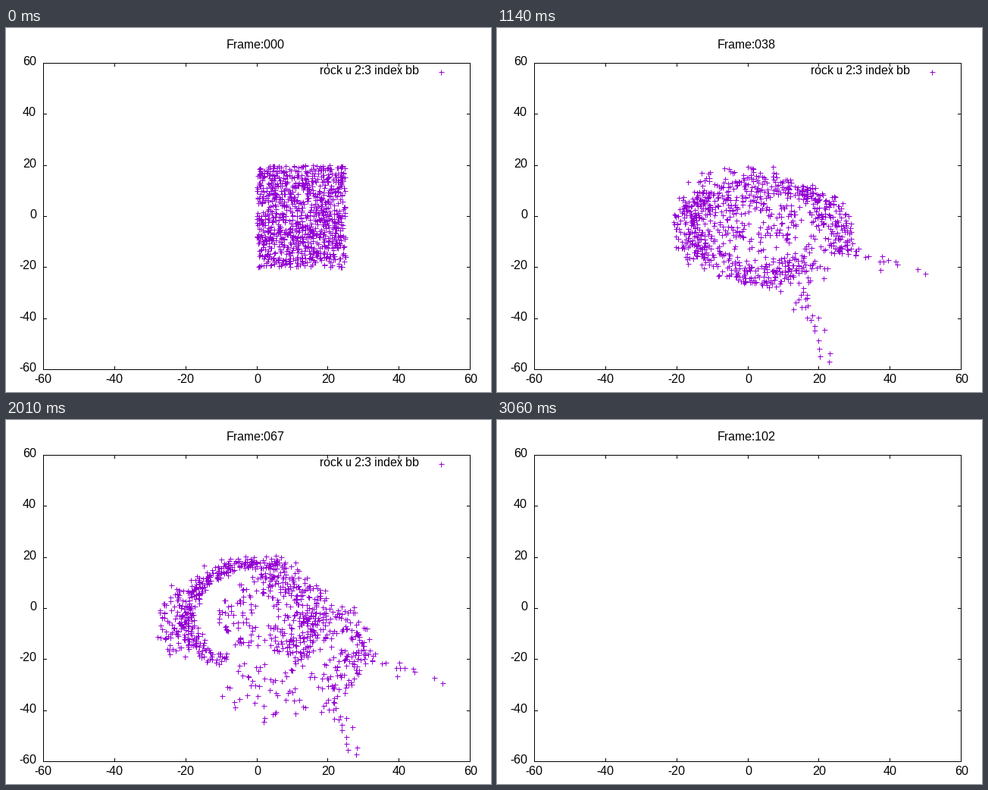
A matplotlib script that plays this animation: 640x480 px, repeating every 3.09 s.

```python
import numpy as np
import matplotlib.pyplot as plt
from matplotlib.animation import FuncAnimation

W, H, DPI = 640, 480, 100
FRAMES, STEP = 103, 30
PX = 72 / DPI
VIOLET = "#9400d3"
LEFT, RIGHT, TOP, BOTTOM = 49, 612, 45, 449
N = 1000
FALL, SETTLE, WIND = 14, 16, 78   # frames of collapse, easing and winding up
CORE = 0.48

plt.rcParams.update({"font.family": "Liberation Sans",
                     "text.hinting": "native", "text.hinting_factor": 1})
rng = np.random.default_rng(7)

# The starting block and the turned, flattened disc it collapses into
block = np.column_stack([rng.uniform(0, 25, N), rng.uniform(-20, 20, N)])
bx, by = block[:, 0] / 12.5 - 1, block[:, 1] / 20
disc = (bx * np.sqrt(1 - by**2 / 2) + 1j * by * np.sqrt(1 - bx**2 / 2)) * np.exp(-0.6j)
rad = np.abs(disc)
phi = (np.degrees(np.angle(disc)) + 90) % 360 - 90
wx = disc.real + 0.12 * (1 - disc.real**2)
leaf = np.column_stack([8 + 21 * wx, -0.5 + 14.5 * disc.imag + 3 * wx])
noise = rng.normal(0, 0.9, (N, 2))
free = np.ones(N, bool)


def take(idx):
    free[idx] = False
    return idx


def sample(count):
    idx = take(rng.choice(np.flatnonzero(free), count, replace=False))
    return idx, rng.random(count), rng.random(count)


def sector(a, b, inner=CORE, outer=1.0):
    """Pieces of one disc sector with their place along and across it."""
    idx = take(np.flatnonzero(free & (phi >= a) & (phi < b) & (rad >= inner)))
    u = (phi[idx] - a) / (b - a)
    v = np.clip((rad[idx]**2 - inner**2) / (outer**2 - inner**2), 0, 1)
    return idx, u, v


fast = take(np.argsort(rad)[:4])
fast_dir = np.radians(197 + 90 * np.arange(4))
fast_v = 5.6 * np.column_stack([np.cos(fast_dir), np.sin(fast_dir)])

fall_stream, side_stream = sample(22), sample(26)
belt = sector(-90, 40)
lower = sector(40, 80)
right = sector(80, 120)
rim = sector(120, 140)
upper = sector(140, 225)
left = sector(225, 270)
core = sector(-90, 270, 0, CORE)


def ring(part, center, radii, hole, mid, span):
    """Elliptic band around mid degrees; hole is the inner share of the radii."""
    _, u, v = part
    ang = np.radians(mid + span * (u - 0.5))
    rho = np.sqrt(hole**2 + (1 - hole**2) * v)
    return np.array(center) + np.column_stack([np.cos(ang), np.sin(ang)]) * rho[:, None] * radii


def stream(part, head, tail, width):
    _, u, v = part
    s = (u ** 1.6)[:, None]
    side = ((2 * v - 1) * width)[:, None]
    return np.array(head) * (1 - s) + np.array(tail) * s + side * [1, 0.4]


def swirl(t):
    """The winding cloud, t from 0 (just collapsed) to 1."""
    pos = leaf.copy()
    pos[core[0]] = ring(core, (2 + t, -1 - 2 * t), (9 + 8 * t, 10 + 7 * t), 0.2, 90 - 400 * t, 360)
    pos[belt[0]] = ring(belt, (5.5 - 8 * t, -5 + 3 * t), (20 + 2 * t, 22),
                        min(0.5 + 0.5 * t, 0.86), -75 - 195 * t, 175)
    pos[lower[0]] = ring(lower, (6 - 4 * t, -3 - 4 * t), (21 + 6 * t, 17 + 29 * t),
                         0.62 - 0.3 * t, -20 - 75 * t, 80 + 40 * t)
    pos[right[0]] = ring(right, (4 + 4 * t, -1 - 20 * t), (23 + t, 18 + 14 * t),
                         0.9 - 0.25 * t, 45 - 72 * t, 85)
    pos[rim[0]] = ring(rim, (-2, -2), (18 + 4 * t, 21 + 2 * t), 0.8, 120 - 30 * t, 120)
    pos[upper[0]] = ring(upper, (3, -4), (21.5 - 5 * t, 20 - 2 * t),
                         0.95 - 0.6 * t, 128 - 168 * t, 150 + 30 * t)
    pos[left[0]] = ring(left, (1 - 6 * t, -3 - 4 * t), (16 + 13 * t, 21 + 3 * t),
                        0.7, 185 - 20 * t, 85)
    pos[fall_stream[0]] = stream(fall_stream, (11 + 14 * t, -27 - 13 * t), (20 + 14 * t, -57), 2)
    pos[side_stream[0]] = stream(side_stream, (24 + 6 * t, -8 - 13 * t),
                                 (52 + 6 * t, -18 - 19 * t), 1.5)
    return pos


leaf[fall_stream[0]] = stream(fall_stream, (8, -14), (6, -47), 1.5)
offset = leaf - swirl(0)


def rocks(n):
    if n <= FALL:
        pos = block + (leaf - block) * n / FALL
    else:
        s = min((n - FALL) / SETTLE, 1)
        ease = s * s * (3 - 2 * s)
        pos = swirl((n - FALL) / WIND) + (1 - ease) * offset + s * noise
    pos[fast] = block[fast] + fast_v * n
    return pos[(np.abs(pos) <= 60).all(axis=1)]


fig = plt.figure(figsize=(W / DPI, H / DPI), dpi=DPI, facecolor="white")
ax = fig.add_axes([0, 0, 1, 1])
ax.set_xlim(0, W)
ax.set_ylim(H, 0)
ax.axis("off")


def to_px(x, y):
    px = LEFT + (x + 60) / 120 * (RIGHT - LEFT)
    py = BOTTOM - (y + 60) / 120 * (BOTTOM - TOP)
    return np.floor(px + 0.5), np.floor(py + 0.5)


def line(xs, ys):
    # snapping moves strokes half a pixel right and up, hence y + 1
    ax.plot(xs, np.add(ys, 1), color="black", lw=PX, antialiased=False,
            solid_capstyle="projecting", zorder=3)


def label(x, y, text, ha):
    return ax.text(x, y, text, fontsize=16 * PX, ha=ha, va="baseline", zorder=4)


def crosses(x, y):
    return ax.plot(x, np.add(y, 1), "+", color=VIOLET, ms=7 * PX, mew=PX,
                   antialiased=False, clip_on=False, zorder=2)[0]


line([LEFT, RIGHT, RIGHT, LEFT, LEFT], [TOP, TOP, BOTTOM, BOTTOM, TOP])
for val in range(-60, 61, 20):
    tx, ty = to_px(val, val)
    line([tx, tx], [BOTTOM, BOTTOM - 4])
    line([tx, tx], [TOP, TOP + 4])
    line([LEFT, LEFT + 4], [ty, ty])
    line([RIGHT, RIGHT - 4], [ty, ty])
    label(tx + (val >= 0), 468, str(val), "center")
    label(40, ty + 4, str(val), "right")

title = label(291, 27, "", "left")
key_text = label(545, 61, "rock u 2:3 index bb", "right")
key_mark = crosses([574], [57])
cloud = crosses([], [])


def draw(n):
    title.set_text(f"Frame:{n:03d}")
    shown = n < FRAMES - 1
    for item in (cloud, key_text, key_mark):
        item.set_visible(shown)
    if shown:
        x, y = to_px(*rocks(n).T)
        cloud.set_data(x, y + 1)
    return cloud, title, key_text, key_mark


anim = FuncAnimation(fig, draw, frames=FRAMES, interval=STEP, repeat=True, repeat_delay=0)
plt.show()
```
